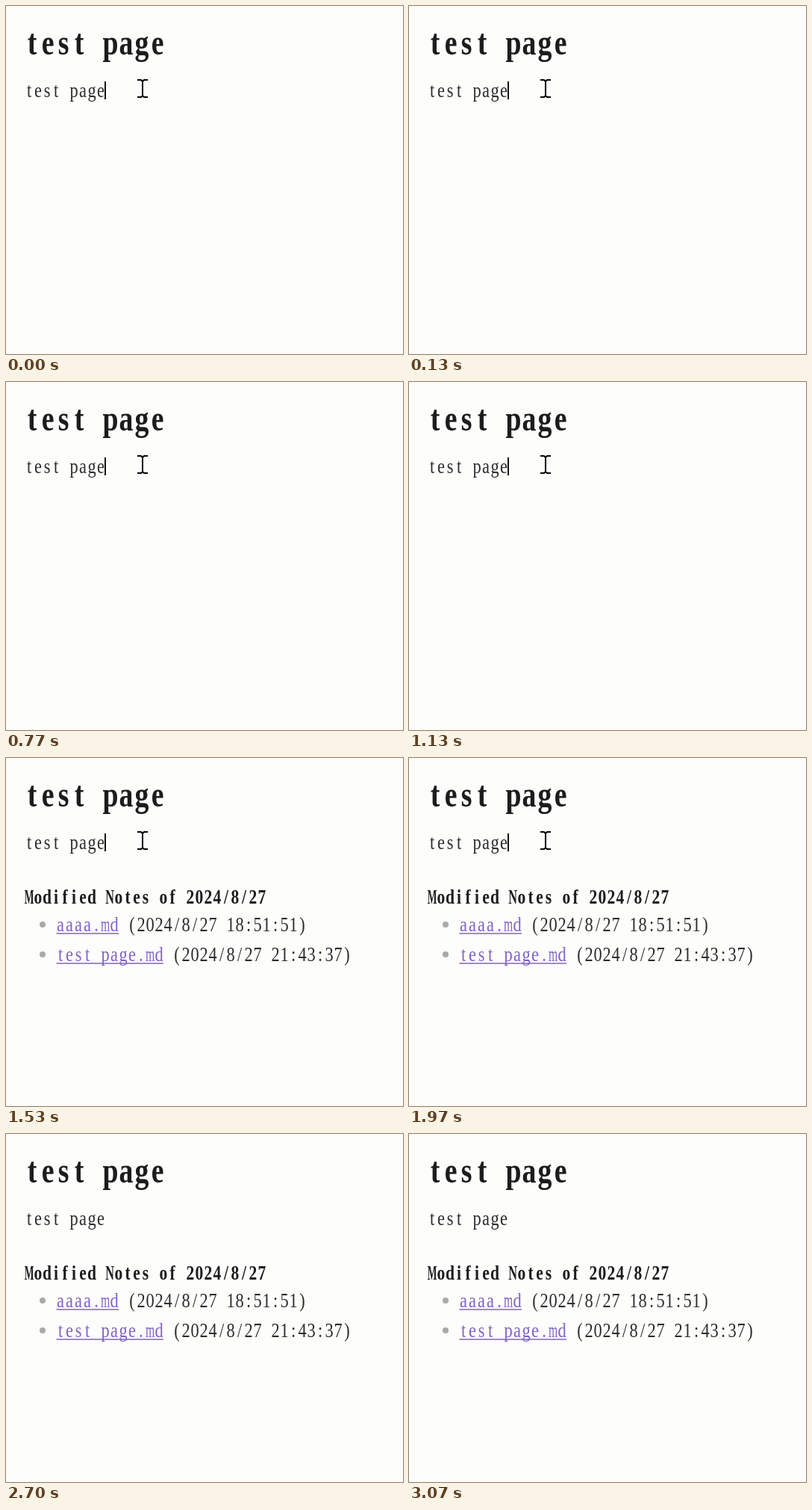
Recreate the animation shown at these times as an HTML page. Size 532x466 px, loop 3.23 s.

```html
<!DOCTYPE html>
<html lang="en">
<head>
<meta charset="utf-8">
<title>test page</title>
<style>
  html, body { margin: 0; width: 100%; height: 100%; overflow: hidden; background: #fdfdfb; }
  svg { display: block; width: 532px; height: 466px; }
  text { font-family: "Liberation Serif", "Noto Serif", serif; font-size: 28px; fill: #2c2c2c; text-anchor: middle; }
  .title text { font-size: 49px; }
  .bold text { font-weight: bold; fill: #1c1c1c; }
  .link text { fill: #8062c6; }
  .link path { stroke: #8062c6; stroke-width: 1.6; }
  .dot { fill: #a9a9a9; }
  .notes { animation: appear 3230ms step-end infinite; }
  .pointers { animation: leave 3230ms step-end infinite; }
  @keyframes appear { 0% { opacity: 0; } 47.34%, 100% { opacity: 1; } }
  @keyframes leave { 0% { opacity: 1; } 72.1%, 100% { opacity: 0; } }
</style>
</head>
<body>
<svg viewBox="0 0 532 466">
  <g id="page"></g>
  <g id="notes" class="notes">
    <circle class="dot" cx="49" cy="223" r="4"/>
    <circle class="dot" cx="49" cy="263" r="4"/>
  </g>
  <g class="pointers">
    <rect x="132" y="101" width="2" height="24" fill="#111"/>
    <path d="M176 99h5l2 2 2-2h5M183 100v21M176 122h5l2-2 2 2h5" fill="none" stroke="#000" stroke-width="2"/>
  </g>
</svg>
<script>
  const NS = 'http://www.w3.org/2000/svg';

  function add(parent, tag, attrs) {
    const el = document.createElementNS(NS, tag);
    for (const key in attrs) el.setAttribute(key, attrs[key]);
    return parent.appendChild(el);
  }

  // Half-width face: every glyph sits in the middle of an equal cell.
  function squeeze(ch, bold) {
    if (ch === 'M') return 0.48;
    if (ch === 'm') return 0.56;
    if (ch === 'N') return 0.58;
    return bold ? 0.77 : 0.8;
  }

  function write(parent, str, x, y, cls = '', cell = 12) {
    const line = add(parent, 'g', { class: cls, transform: `translate(${x} ${y})` });
    const bold = cls.includes('bold');
    if (cls === 'link') add(line, 'path', { d: `M0.5 3h${str.length * cell - 0.5}` });
    [...str].forEach((ch, i) => {
      if (ch === ' ') return;
      const place = `translate(${(i + 0.5) * cell} 0) scale(${squeeze(ch, bold)} 1)`;
      add(line, 'text', { transform: place }).textContent = ch;
    });
  }

  const page = document.getElementById('page');
  const notes = document.getElementById('notes');

  write(page, 'test page', 24.5, 65, 'title bold', 21);
  write(page, 'test page', 25, 122);
  write(notes, 'Modified Notes of 2024/8/27', 25, 194.5, 'bold');
  write(notes, 'aaaa.md', 67, 232, 'link');
  write(notes, '(2024/8/27 18:51:51)', 163, 232);
  write(notes, 'test page.md', 67, 272, 'link');
  write(notes, '(2024/8/27 21:43:37)', 223, 272);
</script>
</body>
</html>
```
